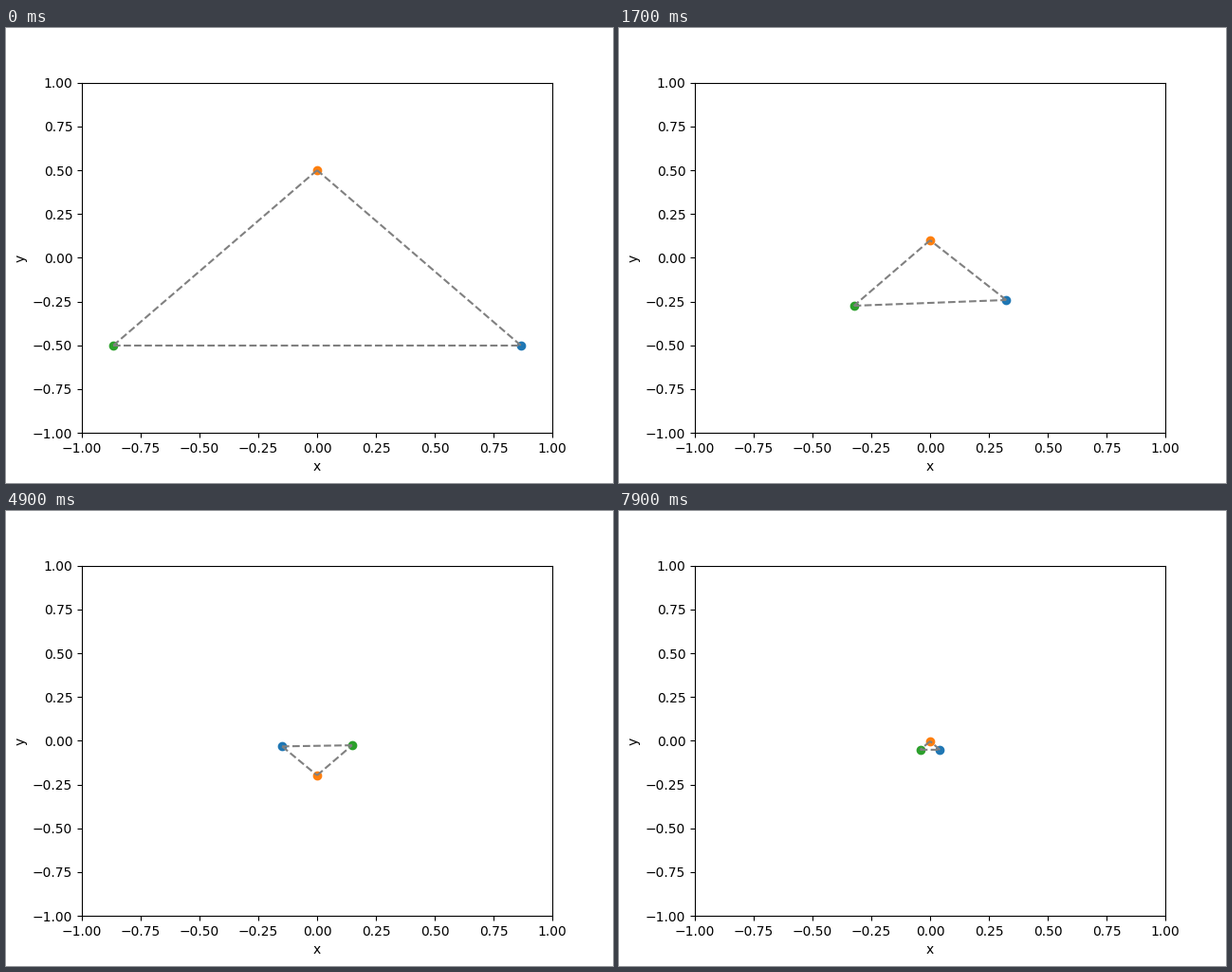
Recreate the animation shown at these times as a matplotlib script. Size 640 by 480 pixels, loop 8000 ms.

```python
import numpy as np
import matplotlib.pyplot as plt
from matplotlib.animation import FuncAnimation

FRAMES, DT = 80, 0.1
STIFF, DAMP = 0.25, 0.25  # spring and damper between every pair

# Three unit masses; the first one gets a small upward kick.
start = np.array([[np.sqrt(3) / 2, -0.5], [0, 0.5], [-np.sqrt(3) / 2, -0.5]])
kick = np.array([[0, 0.05], [0, 0], [0, 0]])
center, drift = start.mean(axis=0), kick.mean(axis=0)
decay = 1.5 * DAMP
omega = np.sqrt(3 * STIFF - decay**2)


def positions(t):
    """Steadily drifting centroid plus a damped oscillation around it."""
    u, v = start - center, kick - drift
    swing = u * np.cos(omega * t) + (v + decay * u) / omega * np.sin(omega * t)
    return center + drift * t + np.exp(-decay * t) * swing


fig, ax = plt.subplots(figsize=(6.4, 4.8), dpi=100)
ax.set(xlim=(-1, 1), ylim=(-1, 1), xlabel="x", ylabel="y")

masses = [ax.plot([], [], "o", color=f"C{i}")[0] for i in range(3)]
pairs = [(0, 1), (1, 2), (2, 0)]
springs = [ax.plot([], [], "--", color="gray")[0] for _ in pairs]


def update(n):
    pos = positions(n * DT)
    for dot, (x, y) in zip(masses, pos):
        dot.set_data([x], [y])
    for line, (i, j) in zip(springs, pairs):
        line.set_data(*pos[[i, j]].T)
    return masses + springs


anim = FuncAnimation(fig, update, frames=FRAMES, interval=1000 * DT,
                     repeat=True, repeat_delay=0)
plt.show()
```
